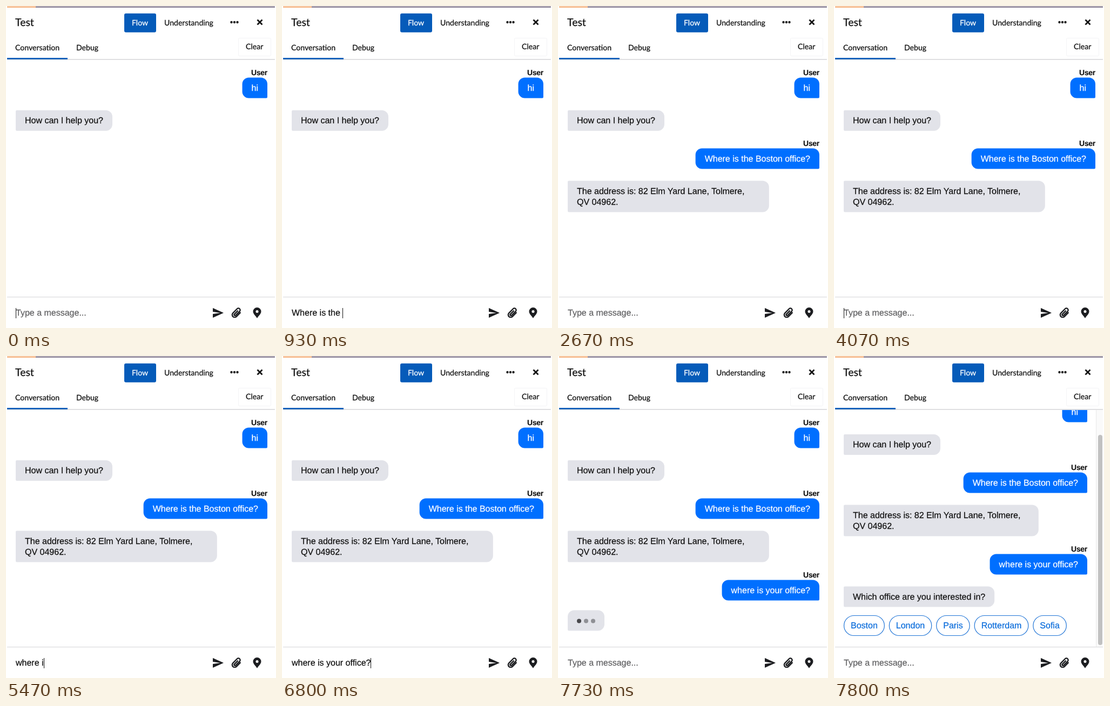
These frames come from a looping animation (500x596 px, 8 s). An HTML page with a canvas:

```html
<!DOCTYPE html>
<html lang="en">
<head>
<meta charset="utf-8">
<title>Chat test panel</title>
<style>
  html, body { margin: 0; width: 100%; height: 100%; overflow: hidden; background: #fff; }
  canvas { display: block; width: 500px; height: 596px; }
</style>
</head>
<body>
<canvas id="stage"></canvas>
<script>
const W = 500, H = 596, LOOP = 8000, STEP = 1000 / 15, BLINK = 486;
const LEFT = 18, PAD = 17;
const BLUE = '#006fff', NAVY = '#055bb9', GREY = '#e2e3e9', INK = '#111', ICON = '#1c1d20';
const UI = 'Lato, sans-serif';
const CHAT = '"Liberation Sans", Arial, sans-serif';

const canvas = document.getElementById('stage');
const ctx = canvas.getContext('2d');
const dpr = window.devicePixelRatio || 1;
canvas.width = W * dpr;
canvas.height = H * dpr;
ctx.textRendering = 'geometricPrecision';

// Each burst types its text evenly: start, end, text, characters shown at once
const entries = [
  { sent: 2070, bursts: [
    [130, 600, 'Where is '], [800, 930, 'the '], [1070, 1130, 'Bo'], [1270, 1930, 'ston office?']] },
  { sent: 7200, bursts: [
    [5000, 5330, 'where'], [5470, 6000, ' is your ', 2], [6200, 6600, 'office'], [6800, 6801, '?']] }
];
const [first, second] = entries;
for (const e of entries) e.text = e.bursts.map(b => b[2]).join('');

function typedText(entry, t) {
  return entry.bursts.map(([from, to, str, lead = 1]) => {
    if (t < from) return '';
    const part = Math.min(1, (t - from) / (to - from));
    return str.slice(0, lead + Math.floor((str.length - lead) * part));
  }).join('');
}

// A thin outline gives the text a slightly heavier weight
function text(str, x, y, color, font, align = 'left', weight = 0.25) {
  ctx.font = font;
  ctx.fillStyle = ctx.strokeStyle = color;
  ctx.textAlign = align;
  ctx.lineWidth = weight;
  ctx.fillText(str, x, y);
  ctx.strokeText(str, x, y);
}

function rect(x, y, w, h, color) {
  ctx.fillStyle = color;
  ctx.fillRect(x, y, w, h);
}

function round(x, y, w, h, radius, color) {
  ctx.beginPath();
  ctx.roundRect(x, y, w, h, radius);
  ctx.fillStyle = color;
  ctx.fill();
}

function outline(x, y, w, h, radius, color, width) {
  ctx.beginPath();
  ctx.roundRect(x, y, w, h, radius);
  ctx.strokeStyle = color;
  ctx.lineWidth = width;
  ctx.stroke();
}

function dot(x, y, r, color) {
  ctx.beginPath();
  ctx.arc(x, y, r, 0, 7);
  ctx.fillStyle = color;
  ctx.fill();
}

const chat = (str, x, y, color = INK, align) => text(str, x, y, color, '16px ' + CHAT, align);
const ui = (str, x, y, color = INK, size = 14.1) => text(str, x, y, color, size + 'px ' + UI);

function chatWidth(str) {
  ctx.font = '16px ' + CHAT;
  return ctx.measureText(str).width;
}

function userMessage(str, right, y) {
  const width = chatWidth(str) + 2 * PAD;
  ctx.letterSpacing = '-0.3px';
  text('User', right, y - 5, INK, 'bold 14px ' + CHAT, 'right', 0.1);
  ctx.letterSpacing = '0px';
  round(right - width, y - 0.4, width, 38, [12, 12, 2, 12], BLUE);
  chat(str, right - width + PAD, y + 24, '#fff');
}

function botMessage(lines, right, y) {
  const width = lines.length > 1 ? 0.8 * (right - LEFT) : chatWidth(lines[0]) + 2 * PAD;
  round(LEFT, y, width, 18 + 20 * lines.length, [2, 12, 12, 2], GREY);
  lines.forEach((line, i) => chat(line, LEFT + PAD, y + 24 + 20 * i));
}

function typingDots(y, age) {
  round(LEFT, y, 68, 38, [12, 12, 12, 2], GREY);
  const lead = 0.4 + 0.35 * Math.min(1, age / 140);
  [lead, 0.4, 0.4].forEach((a, i) => dot(39 + 13 * i, y + 20, 4, `rgba(20,20,22,${a})`));
}

function choices(names, y) {
  let x = LEFT;
  for (const name of names) {
    const w = chatWidth(name) + 26;
    outline(x + 0.5, y + 0.5, w - 1, 37, 18.5, '#1f74d6', 1.2);
    chat(name, x + w / 2, y + 24, '#0a6cdb', 'center');
    x += w + 8;
  }
}

function conversation(t) {
  const scrolled = t >= 7800;
  const right = scrolled ? 469 : 484;
  ctx.save();
  ctx.beginPath();
  ctx.rect(0, 100, W, 438);
  ctx.clip();
  ctx.translate(0, scrolled ? -48 : 0);
  userMessage('hi', right, 133);
  botMessage(['How can I help you?'], right, 193);
  if (t >= first.sent) userMessage(first.text, right, 264);
  if (t >= 2670) {
    botMessage(['The address is: 82 Elm Yard Lane, Tolmere,', 'QV 04962.'], right, 323.5);
  } else if (t >= 2470) {
    typingDots(319.5, t - 2470);
  }
  if (t >= second.sent) userMessage(second.text, right, 415);
  if (scrolled) {
    botMessage(['Which office are you interested in?'], right, 474.5);
    choices(['Boston', 'London', 'Paris', 'Rotterdam', 'Sofia'], 528);
  } else if (t >= 7530) {
    typingDots(470.5, t - 7530);
  }
  ctx.restore();
  if (scrolled) {
    rect(485, 100, 13, 438, '#fafafa');
    rect(485, 100, 1, 438, '#e8e8e8');
    round(489, 146, 8, 389, 4, '#c1c1c1');
  }
}

function header() {
  rect(2, 1, 53, 1.5, '#f08a3c');
  rect(55, 1, 443, 1.5, '#4b3f5c');
  ui('Test', 17, 37, INK, 19.5);
  round(219, 13.7, 59, 35, 3, NAVY);
  ui('Flow', 233, 36, '#fff');
  ui('Understanding', 293, 36);
  for (const x of [417.5, 423, 428.5]) dot(x, 30, 2.2, INK);
  ctx.beginPath();
  ctx.moveTo(465.5, 25.5); ctx.lineTo(474.5, 34.5);
  ctx.moveTo(474.5, 25.5); ctx.lineTo(465.5, 34.5);
  ctx.strokeStyle = INK;
  ctx.lineWidth = 2.8;
  ctx.stroke();
  ui('Conversation', 17, 82);
  ui('Debug', 130, 82);
  outline(430.5, 59.5, 60, 33, 2, '#f3f3f5', 1);
  ui('Clear', 444, 80);
  rect(2, 98, 496, 1.7, '#dadadc');
  rect(2, 96, 112, 2.7, NAVY);
}

const sendIcon = new Path2D('M383 559L403 568L383 577V570L397 568L383 566Z');
const clipIcon = new Path2D('M4.6-5V5A4.6 4.6 0 0 1-4.6 5V-6A3.3 3.3 0 0 1 2-6V4.5A1.5 1.5 0 0 1-1.2 4.5V-4');
const pinIcon = new Path2D('M465 578C463 574 457.5 570 457.5 565.5A7.5 7.5 0 0 1 472.5 565.5C472.5 570 467 574 465 578Z');

function icons() {
  ctx.fillStyle = ctx.strokeStyle = ICON;
  ctx.fill(sendIcon);
  ctx.fill(pinIcon);
  ctx.save();
  ctx.translate(427, 568);
  ctx.rotate(Math.PI / 4);
  ctx.lineWidth = 2.4;
  ctx.lineCap = 'round';
  ctx.stroke(clipIcon);
  ctx.restore();
  dot(465, 565.5, 2.5, '#fff');
}

function inputBar(t) {
  rect(2, 538, 496, 1.3, '#dedee0');
  const entry = entries.find(e => t >= e.bursts[0][0] && t < e.sent);
  let caret = LEFT, idle = 0;
  if (entry) {
    const typed = typedText(entry, t);
    chat(typed, LEFT, 573);
    caret += Math.round(chatWidth(typed));
  } else {
    chat('Type a message...', LEFT, 573, '#606062');
    idle = t - Math.max(0, ...entries.map(e => e.sent).filter(s => s <= t));
  }
  if (Math.floor(idle / BLINK) % 2 === 0) rect(caret, 559, 1, 19, INK);
  icons();
}

function draw(t) {
  ctx.setTransform(dpr, 0, 0, dpr, 0, 0);
  rect(0, 0, W, H, '#fff');
  conversation(t);
  header();
  inputBar(t);
}

// The screen refreshes 15 times a second, on times rounded to 10 ms
const refresh = t => Math.round(Math.floor((t + 4) / STEP) * STEP / 10) * 10;

const start = performance.now();
function tick() {
  draw(refresh((performance.now() - start) % LOOP));
  requestAnimationFrame(tick);
}
tick();
</script>
</body>
</html>
```
